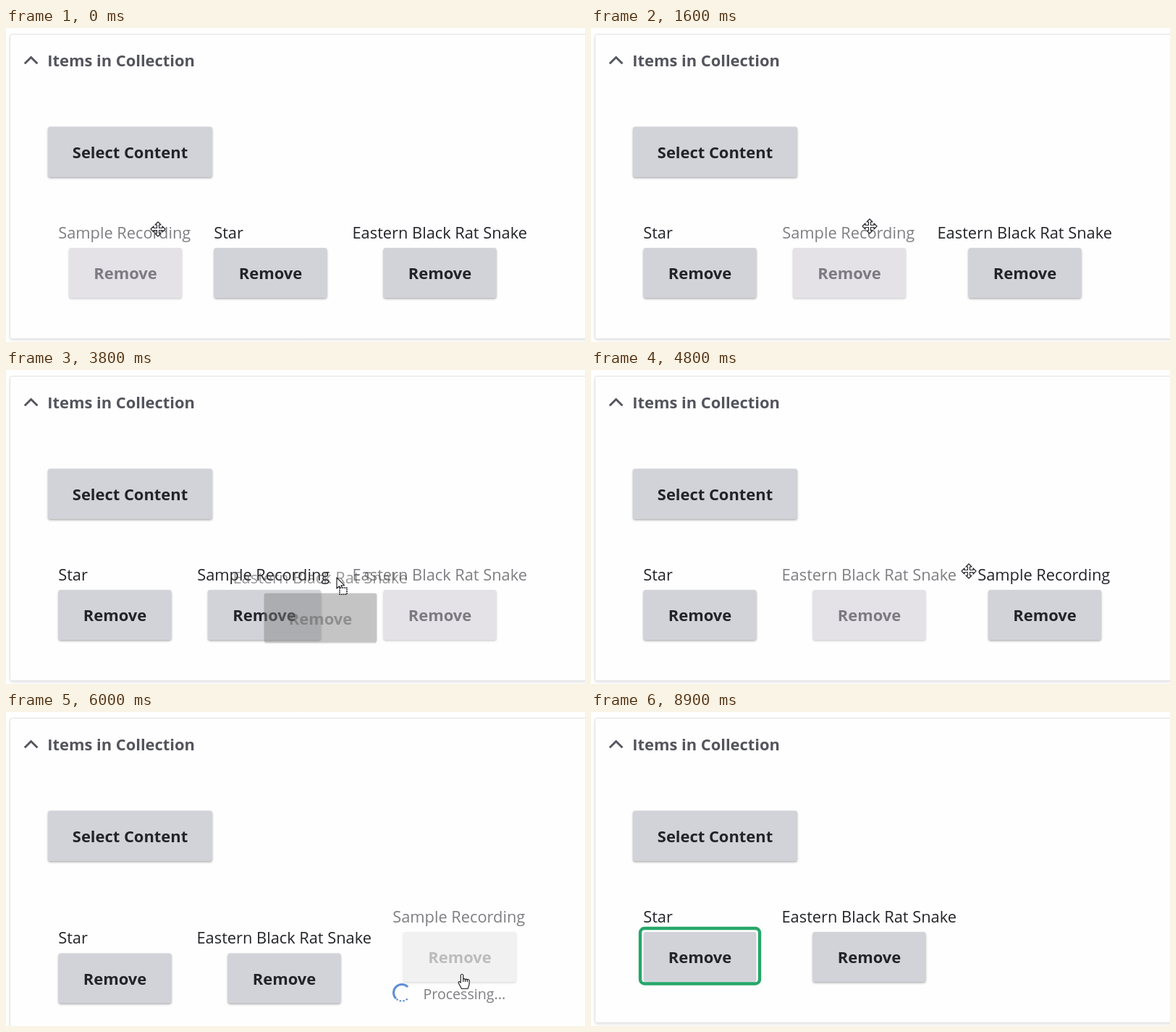
These frames come from a looping animation (800x434 px, 9000 ms). An HTML page with a canvas:

```html
<!DOCTYPE html>
<html lang="en">
<head>
<meta charset="utf-8">
<title>Items in Collection</title>
<style>
html, body { margin: 0; width: 100%; height: 100%; overflow: hidden; background: #fff; }
canvas { display: block; width: 800px; height: 434px; }
</style>
</head>
<body>
<canvas id="stage" width="800" height="434"></canvas>
<script>
const ctx = document.getElementById('stage').getContext('2d');
const LOOP = 9000, STEP = 100;
const REGULAR = '21.8px "Open Sans", "Noto Sans", sans-serif';
const SMALL = '19.6px "Open Sans", "Noto Sans", sans-serif';
const BOLD = 'bold 21.9px "Open Sans", "Noto Sans", sans-serif';
const BTN_W = 156, BTN_H = 69, BTN_Y = 304, LABEL_Y = 290.5;

// w: content width, next: distance to the following item, btn: button inset
const ITEMS = {
  sample: { label: 'Sample Recording', w: 185, next: 215, btn: 15, ink: 0.2 },
  star: { label: 'Star', w: 156, next: 192, btn: 0.5, ink: 0.2 },
  snake: { label: 'Eastern Black Rat Snake', w: 241, next: 270, btn: 42.5, ink: -0.5 }
};

const ORDERS = [
  { from: 0, list: ['sample', 'star', 'snake'] },
  { from: 700, list: ['star', 'sample', 'snake'] },
  { from: 4000, list: ['star', 'snake', 'sample'] },
  { from: 6700, list: ['star', 'snake'] }
];

const DRAGS = [
  { key: 'sample', from: 300, to: 1200, home: 72, x: 210, y: 278 },
  { key: 'snake', from: 3300, to: 4100, home: 479, x: 622, y: 282.5 }
];

const BUSY = { from: 5600, to: 6700 };
const CURSOR_GONE = 7500;

const PATH = [
  [0, 210, 278], [300, 210, 278], [800, 330, 283], [1100, 385, 275],
  [1600, 385, 274], [2100, 385, 274], [2800, 610, 283], [3100, 615, 283],
  [3300, 622, 282.5], [3800, 457, 287], [4000, 405, 289], [4300, 405, 285],
  [4800, 522, 278], [5400, 630, 362], [7000, 630, 362], [7500, 654, 362]
];

const THEME = {
  normal: { label: '#232429', fill: '#d2d3d9', text: '#232429', shadow: 0.32 },
  focus: { label: '#232429', fill: '#d2d3d9', text: '#232429', shadow: 0 },
  faded: { label: '#7f7f83', fill: '#e4e2e7', text: '#7c7b81', shadow: 0.2 },
  busy: { label: '#7f7f83', fill: '#f1f1f1', text: '#bcbcbc', shadow: 0.14 }
};

const during = (t, span) => t >= span.from && t < span.to;

function cursorAt(t) {
  const i = PATH.findIndex(p => p[0] > t);
  if (i < 0) return { x: PATH.at(-1)[1], y: PATH.at(-1)[2] };
  const [t0, x0, y0] = PATH[i - 1], [t1, x1, y1] = PATH[i];
  const k = (t - t0) / (t1 - t0);
  return { x: x0 + (x1 - x0) * k, y: y0 + (y1 - y0) * k };
}

function layout(t) {
  let x = 72;
  return ORDERS.filter(o => o.from <= t).at(-1).list.map(key => {
    const spot = { key, x, ...ITEMS[key] };
    x += spot.next;
    return spot;
  });
}

function text(str, x, y, font, color, align = 'left') {
  ctx.font = font;
  ctx.fillStyle = color;
  ctx.textAlign = align;
  ctx.fillText(str, x, y);
}

function box(x, y, w, h, r) {
  ctx.beginPath();
  ctx.roundRect(x, y, w, h, r);
}

function button(str, x, y, w, h, look) {
  ctx.save();
  ctx.shadowColor = `rgba(0,0,0,${look.shadow})`;
  ctx.shadowBlur = 3;
  ctx.shadowOffsetY = 1.5;
  ctx.fillStyle = look.fill;
  box(x, y, w, h, 3);
  ctx.fill();
  ctx.restore();
  text(str, x + w / 2, y + h / 2 + 8.5, BOLD, look.text, 'center');
}

function item(spot, dy, look) {
  const bx = spot.x + spot.btn, by = BTN_Y + dy;
  text(spot.label, spot.x + spot.ink, LABEL_Y + dy, REGULAR, look.label);
  if (look === THEME.focus) {
    box(bx - 4.5, by - 5, BTN_W + 9, BTN_H + 7.5, 6);
    ctx.fillStyle = '#fff';
    ctx.fill();
    ctx.strokeStyle = '#26a769';
    ctx.lineWidth = 4.4;
    ctx.stroke();
  }
  button('Remove', bx, by, BTN_W, BTN_H, look);
}

function ghost(drag, cur) {
  const it = ITEMS[drag.key];
  const x = drag.home + cur.x - drag.x, dy = cur.y - drag.y;
  const bx = x + it.btn, by = BTN_Y + dy;
  text(it.label, x + it.ink, LABEL_Y + dy, REGULAR, 'rgba(70,70,70,.55)');
  ctx.fillStyle = 'rgba(130,130,130,.465)';
  box(bx, by, BTN_W, BTN_H - 1, 3);
  ctx.fill();
  ctx.fillStyle = 'rgba(0,0,0,.12)';
  ctx.fillRect(bx + 1, by + BTN_H - 1, BTN_W - 2, 1.5);
  text('Remove', bx + BTN_W / 2, by + 43, BOLD, 'rgba(90,90,90,.5)', 'center');
}

function card(bottom) {
  ctx.save();
  ctx.shadowColor = 'rgba(0,0,0,.12)';
  ctx.shadowBlur = 4;
  ctx.shadowOffsetY = 2;
  ctx.fillStyle = '#fefefe';
  box(5.5, 8.5, 820, bottom - 8.5, 3);
  ctx.fill();
  ctx.restore();
  ctx.strokeStyle = '#e2e2e4';
  ctx.lineWidth = 1;
  ctx.stroke();

  ctx.strokeStyle = '#55565f';
  ctx.lineWidth = 3;
  ctx.lineJoin = 'miter';
  ctx.beginPath();
  ctx.moveTo(25.8, 49.3);
  ctx.lineTo(34.6, 40.5);
  ctx.lineTo(43.4, 49.3);
  ctx.stroke();
  text('Items in Collection', 57.2, 53, BOLD, '#54545d');
  button('Select Content', 58, 136.5, 227, 69.5, THEME.normal);
}

function throbber(t) {
  ctx.save();
  ctx.translate(547, 388);
  ctx.rotate(t / 750 * Math.PI * 2);
  ctx.strokeStyle = ctx.fillStyle = '#5f8fd6';
  ctx.lineWidth = 3;
  ctx.beginPath();
  ctx.arc(0, 0, 11.5, Math.PI * 0.75, Math.PI * 1.75);
  ctx.stroke();
  for (let i = 0; i < 4; i++) {
    const a = Math.PI * (0.3 + i * 0.13);
    ctx.beginPath();
    ctx.arc(11.5 * Math.cos(a), 11.5 * Math.sin(a), 1.3, 0, 7);
    ctx.fill();
  }
  ctx.restore();
  text('Processing...', 576.5, 397, SMALL, '#7f7f83');
}

function outline(points, width) {
  ctx.beginPath();
  points.forEach(([x, y]) => ctx.lineTo(x, y));
  ctx.closePath();
  ctx.lineWidth = width;
  ctx.fill();
  ctx.stroke();
}

const POINTERS = {
  move() {
    const arm = [[-1.5, -1.5], [-1.5, -6], [-4, -6], [0, -10], [4, -6], [1.5, -6]];
    const turn = (p, n) => n ? turn([-p[1], p[0]], n - 1) : p;
    outline([0, 1, 2, 3].flatMap(n => arm.map(p => turn(p, n))), 1.2);
  },
  arrow() {
    outline([[0, 0], [0, 15], [3.5, 11.8], [6, 17.2], [8.4, 16.1], [6, 10.9], [10.6, 10.6]], 1.2);
  },
  drag() {
    POINTERS.arrow();
    ctx.fillRect(4, 14, 10, 9);
    ctx.setLineDash([2, 0.8]);
    ctx.lineWidth = 1.5;
    ctx.strokeRect(4, 14, 10, 9);
  },
  hand() {
    ctx.beginPath();
    ctx.moveTo(-1.7, 12);
    ctx.lineTo(-1.7, 1.5);
    ctx.quadraticCurveTo(0, -1, 1.7, 1.5);
    ctx.lineTo(1.7, 7);
    for (let x = 1.7; x < 9; x += 2.8) {
      ctx.quadraticCurveTo(x + 1.4, 5.2 + x * 0.15, x + 2.8, 8 + x * 0.12);
    }
    ctx.lineTo(10.1, 14);
    ctx.quadraticCurveTo(9.6, 17, 8, 20.5);
    ctx.lineTo(-0.5, 20.5);
    ctx.lineTo(-4.8, 12.5);
    ctx.quadraticCurveTo(-5, 9, -1.7, 12);
    ctx.closePath();
    ctx.fill();
    ctx.stroke();
    ctx.beginPath();
    for (const x of [1.7, 4.5, 7.3]) {
      ctx.moveTo(x, 7);
      ctx.lineTo(x, 11);
    }
    ctx.stroke();
  }
};

function pointer(kind, cur) {
  ctx.save();
  ctx.translate(cur.x, cur.y);
  ctx.fillStyle = '#fff';
  ctx.strokeStyle = '#25252b';
  ctx.lineWidth = 1.2;
  ctx.lineJoin = 'round';
  POINTERS[kind]();
  ctx.restore();
}

function draw(t) {
  const cur = cursorAt(t);
  const spots = layout(t);
  const drag = DRAGS.find(d => during(t, d));
  const busy = during(t, BUSY);
  const done = t >= BUSY.to;
  const hover = drag
    ? spots.find(s => s.key === drag.key)
    : !done && spots.find(s => cur.x >= s.x - 18 && cur.x <= s.x + s.w + 18);

  ctx.fillStyle = '#fff';
  ctx.fillRect(0, 0, 800, 434);
  card(busy ? 459 : 429.5);

  for (const s of spots) {
    const active = busy && s.key === 'sample';
    const look = active ? THEME.busy
      : s === hover ? THEME.faded
      : done && s.key === 'star' ? THEME.focus : THEME.normal;
    item(s, busy && !active ? 29.5 : 0, look);
  }
  if (busy) throbber(t);
  if (drag) ghost(drag, cur);

  if (t < CURSOR_GONE) {
    const bx = hover ? hover.x + hover.btn : 0;
    const onButton = hover && cur.y > BTN_Y && cur.x > bx && cur.x < bx + BTN_W;
    pointer(drag ? 'drag' : onButton ? 'hand' : hover ? 'move' : 'arrow', cur);
  }
}

const start = performance.now();
function tick() {
  const t = (performance.now() - start) % LOOP;
  draw(Math.floor(t / STEP) * STEP);
  requestAnimationFrame(tick);
}
tick();
</script>
</body>
</html>
```
